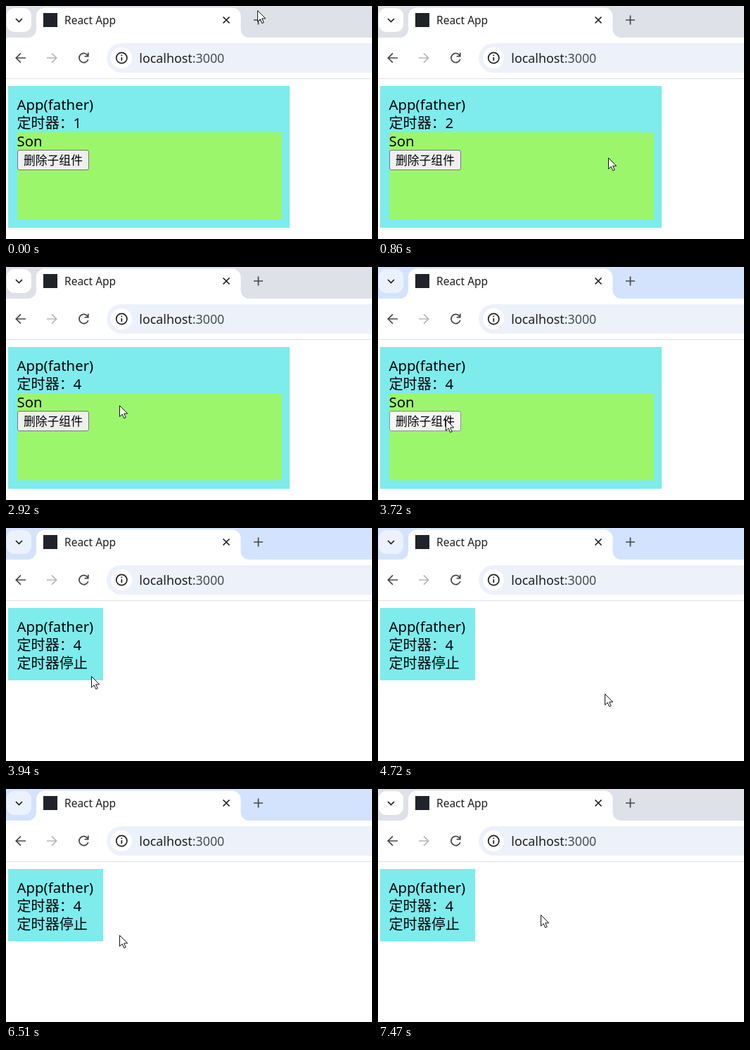
An HTML page that plays this animation: 520x332 px, repeating every 7540 ms.

```html
<!DOCTYPE html>
<html lang="zh-CN">
<head>
<meta charset="utf-8">
<title>Timer demo</title>
<style>
html, body { margin: 0; width: 100%; height: 100%; overflow: hidden; background: #fff; }
svg { display: block; }
text { font-family: 'Noto Sans', 'Noto Sans CJK SC', sans-serif; white-space: pre; }
.page { font-size: 20.1px; }
.page .latin { font-size: 20.4px; font-weight: 500; }
.line { fill: none; stroke: #1f1f1f; stroke-width: 1.7; }
.soft { stroke: #474747; }
.faint { stroke: #b4b6b9; }
</style>
</head>
<body>
<svg width="520" height="332" viewBox="0 0 520 332">
  <!-- tab strip -->
  <rect id="strip" width="520" height="45"/>
  <rect id="menu" x="1" y="3" width="35" height="34" rx="11"/>
  <path class="line" d="M14 18l4.5 4.5 4.5-4.5"/>
  <path fill="#fff" d="M31 45a12 12 0 0 0 12-12V14.5a12 12 0 0 1 12-12H321.5a12 12 0 0 1 12 12V33a12 12 0 0 0 12 12z"/>
  <rect x="53" y="10" width="20" height="20" fill="#20232a"/>
  <text x="83" y="26" font-size="15.5" fill="#1f1f1f">React App</text>
  <path class="line" d="M308.5 15.5l9 9m0-9l-9 9"/>
  <path class="line soft" d="M352 20h13m-6.5-6.5v13"/>

  <!-- toolbar -->
  <path class="line soft" d="M28 74H14.5m6.5-6.7L14.3 74l6.7 6.7"/>
  <path class="line faint" d="M58 74H71.5m-6.5-6.7L71.7 74l-6.7 6.7"/>
  <path class="line soft" d="M116 70.2A6.6 6.6 0 1 0 116.8 76M116.8 66.5v5.2h-5.2"/>
  <rect x="143" y="53" width="420" height="42" rx="21" fill="#edf1fa"/>
  <circle cx="164" cy="74" r="15" fill="#fff"/>
  <circle class="line" cx="164.3" cy="74" r="7.6"/>
  <path class="line" d="M164.3 73v5m0-8.6v1.9"/>
  <text x="189.3" y="81" font-size="17.85" fill="#1f1f1f">localhost<tspan fill="#474b50">:3000</tspan></text>
  <path d="M0 103.5H520" stroke="#dfe2e8"/>

  <!-- page -->
  <g class="page">
    <rect id="father" x="3" y="114" fill="#7eebed"/>
    <text class="latin" x="15.5" y="148">App(father)</text>
    <text x="15.5" y="174">定时器：</text>
    <text id="count" class="latin" x="95.5" y="174"></text>
    <g id="son">
      <rect x="16" y="180" width="376" height="124" fill="#9cf66b"/>
      <text class="latin" x="15.5" y="200">Son</text>
      <rect id="button" x="16.5" y="205.5" width="101" height="28" rx="2.5"/>
      <text x="25" y="226" font-size="16.8">删除子组件</text>
    </g>
    <text id="stopped" x="15.5" y="200">定时器停止</text>
  </g>

  <path id="cursor" fill="#fff" stroke="#111" d="M-.5.5V16.2L3.2 12.8 5.7 18.6 8.2 17.5 5.7 11.9H10.7z"/>
</svg>
<script>
const LOOP = 7540, CLICK = 3720, REMOVED = 3790, BLUR = 7250;
const ORBIT = { from: 4450, to: 5900, period: 850 };

const $ = id => document.getElementById(id);
const ease = u => u * u * (3 - 2 * u);

// Circling of the pointer while its centre drifts right
function orbit(t) {
  const angle = Math.PI * (2 * (t - ORBIT.to) / ORBIT.period + 1);
  const drift = (t - ORBIT.from) / (ORBIT.to - ORBIT.from);
  return [267 + 40 * drift + 64 * Math.cos(angle), 210 + 7 * drift + 38 * Math.sin(angle)];
}

// Places where the pointer turns or rests: time, x, y
const stops = [
  [70, 358, 6], [380, 293, 140], [790, 337, 232], [1010, 302, 168], [1370, 302, 168],
  [1740, 177, 244], [1890, 195, 211], [2400, 137, 233], [2920, 162, 197], [3010, 162, 197],
  [3570, 97, 217], [REMOVED, 97, 217], [ORBIT.from, ...orbit(ORBIT.from)],
  [ORBIT.to, ...orbit(ORBIT.to)], [6510, 162, 208], [7100, 298, -25], [BLUR, 285, -20],
  [7470, 232, 179]
];

function pointer(t) {
  if (t > ORBIT.from && t < ORBIT.to) return orbit(t);
  const next = stops.findIndex(stop => stop[0] > t);
  if (next < 1) return stops.at(next).slice(1);
  const [t0, x0, y0] = stops[next - 1], [t1, x1, y1] = stops[next];
  const u = ease((t - t0) / (t1 - t0));
  return [x0 + (x1 - x0) * u, y0 + (y1 - y0) * u];
}

function set(id, attrs) {
  for (const name in attrs) $(id).setAttribute(name, attrs[name]);
}

function draw(t) {
  const [x, y] = pointer(t);
  const focused = t >= CLICK && t < BLUR;
  const removed = t >= REMOVED;
  const hover = x > 16 && x < 118 && y > 205 && y < 234;
  const [fill, stroke] = t >= CLICK ? ['#f5f5f5', '#8d8d8d']
    : hover ? ['#e5e5e5', '#4f4f4f'] : ['#efefef', '#767676'];

  set('strip', { fill: focused ? '#d3e3fd' : '#dee1e8' });
  set('menu', { fill: focused ? '#ebf2fe' : '#fff' });
  set('father', { width: removed ? 135 : 400, height: removed ? 103 : 202 });
  set('son', { visibility: removed ? 'hidden' : 'visible' });
  set('stopped', { visibility: removed ? 'visible' : 'hidden' });
  set('button', { fill, stroke });
  set('cursor', { transform: `translate(${Math.round(x)} ${Math.round(y)})` });
  $('count').textContent = Math.min(4, 1 + Math.floor((t + 240) / 1000));
}

const start = performance.now();
function tick() {
  draw((performance.now() - start) % LOOP);
  requestAnimationFrame(tick);
}
tick();
</script>
</body>
</html>
```
